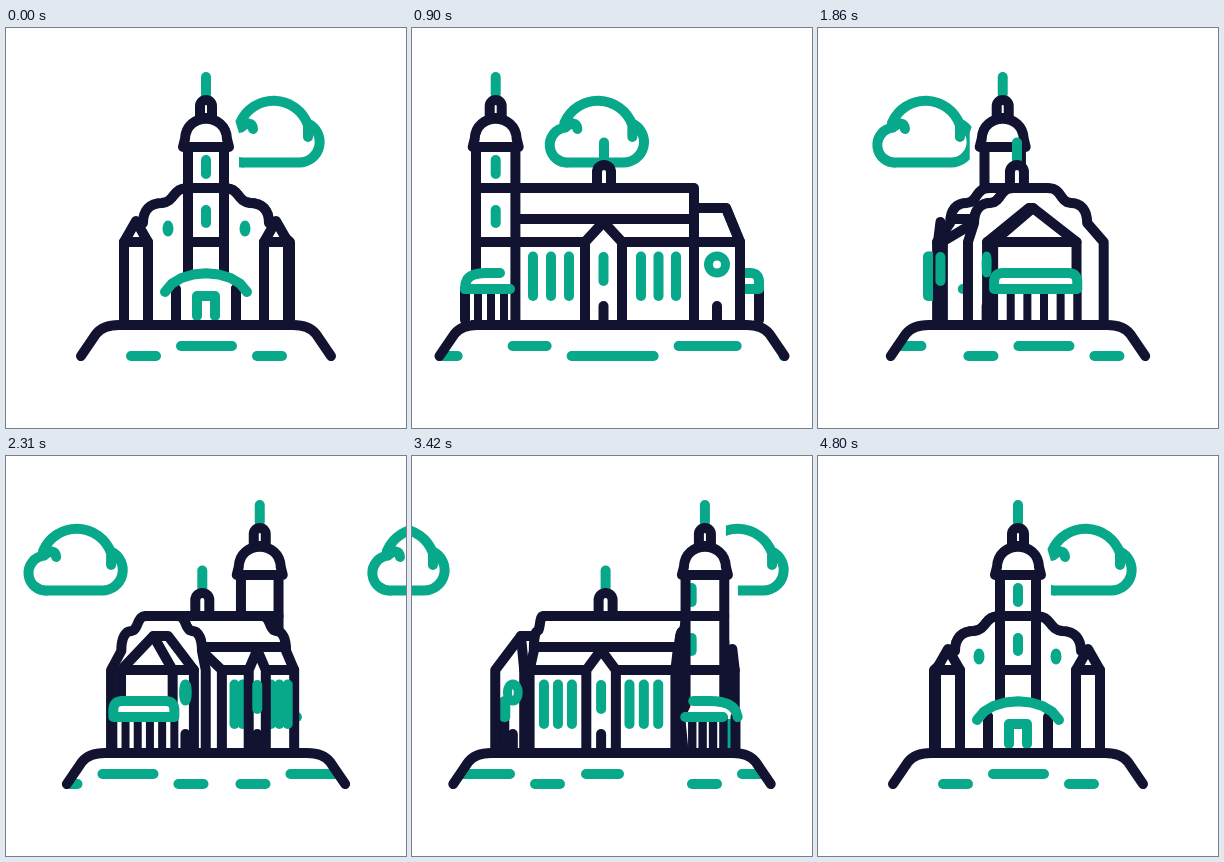
Write an HTML page with a canvas that moves like this. It is 400 px wide and 400 px high and loops after 6830 ms.

```html
<!DOCTYPE html>
<html lang="en">
<head>
<meta charset="utf-8">
<title>Rotating church</title>
<style>
  html, body { margin: 0; width: 100%; height: 100%; overflow: hidden; background: #fff; }
  canvas { display: block; width: 400px; height: 400px; }
</style>
</head>
<body>
<canvas id="stage"></canvas>
<script>
const NAVY = '#121331', TEAL = '#08a88a', WHITE = '#fff';
const LOOP = 6830, TURN = 4800, STEP = 30;
const canvas = document.getElementById('stage');
const ctx = canvas.getContext('2d');
const ratio = window.devicePixelRatio || 1;
canvas.width = canvas.height = 400 * ratio;

// progress of the whole turn: time, share, slope per ms
const KNOTS = [
  [0, 0, .00028], [900, .243, .000252], [1440, .374, .000243], [2310, .586, .000243],
  [2910, .732, .000225], [3900, .912, .00013], [4800, 1, .00004]
];
// dashes on the ground: start, length, height
const DASHES = [
  [125, 25, 328], [175, 51, 318], [251, 25, 328], [331, 34, 318], [390, 82, 328], [497, 58, 318],
  [602, 25, 328], [652, 51, 318], [728, 25, 328], [790, 25, 328], [840, 51, 318], [916, 25, 328],
  [967, 33, 318], [1073, 25, 328], [1123, 51, 318], [1199, 25, 328]
];
const CLOUD = new Path2D(
  'M-28 134.5H26A20.5 20.5 0 0 0 35 95.5M-28 134.5A17.5 17.5 0 0 1 -32 99.5' +
  'Q-21 91 -20 101M-33 95A36.5 36.5 0 0 1 35 97V109');

let p, dir, near, front, side;

const mix = (a, b, k) => a + (b - a) * k;
// lat: distance across the church, len: distance along it
const X = (lat, len) => 200 + near * lat * (1 - p) + dir * len * p;
const towerX = () => 200 + dir * 116.3 * p;

function progress(t) {
  let i = 0;
  while (i < KNOTS.length - 2 && t > KNOTS[i + 1][0]) i++;
  const [t0, a, s0] = KNOTS[i], [t1, b, s1] = KNOTS[i + 1];
  const w = t1 - t0, h = (t - t0) / w, g = 1 - h;
  return a * (1 + 2 * h) * g * g + s0 * w * h * g * g + b * h * h * (3 - 2 * h) - s1 * w * h * h * g;
}

function paint(path, color, fill, width = 10) {
  if (fill) { ctx.fillStyle = fill; path ? ctx.fill(path) : ctx.fill(); }
  if (color) {
    ctx.strokeStyle = color;
    ctx.lineWidth = width;
    path ? ctx.stroke(path) : ctx.stroke();
  }
}

function poly(points, color, fill, closed, width) {
  ctx.beginPath();
  points.forEach(([x, y]) => ctx.lineTo(x, y));
  if (closed) ctx.closePath();
  paint(null, color, fill, width);
}

const line = (x1, y1, x2, y2, color = NAVY, width) => poly([[x1, y1], [x2, y2]], color, null, false, width);
const post = (x, y1, y2, color, width) => line(x, y1, x, y2, color, width);

function bezier(a, b, c, d) {
  const out = [];
  for (let i = 0; i <= 8; i++) {
    const k = i / 8, j = 1 - k;
    out.push([0, 1].map(n => j * j * j * a[n] + 3 * j * j * k * b[n] + 3 * j * k * k * c[n] + k * k * k * d[n]));
  }
  return out;
}

const EDGE = [
  ...bezier([18, 160], [34, 160], [31, 174], [44, 175]),
  ...bezier([44, 175], [56, 175], [63, 182], [63, 195])
];
const gable = (sign, len) => EDGE.map(([lat, y]) => [X(sign * lat, len), y]);

function clouds(u) {
  for (const [x, way] of [[267, 336], [622, 355]]) {
    ctx.save();
    ctx.translate(x - way * u, 0);
    paint(CLOUD, TEAL);
    ctx.restore();
  }
  const c = towerX();
  const half = [[33, 160], [33, 105], [29, 92], [21, 80], [21, 60], [0, 40]];
  poly([...half.map(([x, y]) => [c + x, y]), ...half.map(([x, y]) => [c - x, y]).reverse()], null, WHITE);
}

function tower() {
  const w = mix(18, 19.7, p);
  ctx.save();
  ctx.translate(towerX(), 0);
  post(0, 49, 66, TEAL);
  poly([[-w, 119], [w, 119], [w, 292], [-w, 292]], null, WHITE);
  ctx.save();
  ctx.beginPath();
  ctx.rect(-w, 119, 2 * w, 100);
  ctx.clip();
  const spots = [near * 66 * (1 - p)];
  if (front) spots.push(dir * 31 * p);
  for (const x of spots) {
    post(x, 132, 146, TEAL);
    post(x, 182, 195, TEAL);
  }
  ctx.restore();
  post(-w, 119, 292);
  post(w, 119, 292);
  line(-w, 160, w, 160);
  line(-w, 214, w, 214);
  paint(new Path2D('M-6 90V78A6 6 0 0 1 6 78V90Z'), NAVY, WHITE);
  paint(new Path2D('M-23 119L-21 111C-20 84 20 84 21 111L23 119Z'), NAVY, WHITE);
  ctx.restore();
}

function turret() {
  ctx.save();
  ctx.translate(200 - 8 * p, 0);
  post(0, 114.5, 132, TEAL);
  paint(new Path2D('M-7 158V144A7 7 0 0 1 7 144V158'), NAVY, WHITE);
  ctx.restore();
}

function nave() {
  const backLat = front ? 84 : 100;
  const fx = X(78, 100), bx = X(backLat, -82);
  poly([[fx, 292], [fx, 214], ...gable(1, 100).reverse(), ...gable(1, -82), [bx, 214], [bx, 292]], NAVY, WHITE);
  if (p < .03) return;
  line(X(62, 100), 191, X(62, -82), 191);
  line(fx, 214, bx, 214);
  for (const w of [-64, -46.5, -29]) post(X(front ? 84 : 108, w), 228.5, 268, TEAL);
  for (const w of [43, 61, 79]) post(X(84, w), 228.5, 268, TEAL);
  const l = X(88, -10), r = X(88, 27), mid = X(88, 8.5);
  poly([[l, 292], [l, 214], [mid, 194], [r, 214], [r, 292]], NAVY, WHITE);
  post(mid, 229, 253, TEAL);
  post(mid, 278, 292);
}

function posts(sign, len) {
  const o = X(sign * 82, len), i = X(sign * 58, len);
  poly([[o, 292], [o, 214], [i, 214], [i, 292]], NAVY, WHITE);
  poly([[o, 214], [X(sign * 70, len), 193], [i, 214]], NAVY, WHITE, true);
}

function facade() {
  poly([...gable(1, 100), [X(63, 100), 292], [X(-63, 125), 292], ...gable(-1, 125).reverse()], null, WHITE);
  poly(gable(1, 100), NAVY);
  poly(gable(-1, 125), NAVY);
  if (p < .8) for (const [lat, len] of [[39, 91], [-38, 121]]) {
    ctx.beginPath();
    ctx.ellipse(X(lat, len), 200.5, 5.5 * (1 - p * .3), 8, 0, 0, 7);
    paint(null, null, TEAL);
  }
  posts(-1, 133);
  posts(1, 100);
}

function rear() {
  const far = -82 - 28 * Math.min(1, (1 - p) * 2.5);
  const nx = X(70, -82), fx = X(-82, far);
  poly([[nx, 292], [nx, 214], ...gable(1, -82).reverse(), ...gable(-1, far), [fx, 214], [fx, 292]], NAVY, WHITE);
}

function choir() {
  const w = front ? 72 : 48;
  const corner = X(w, -128), join = X(w, -82), far = X(-w, -128);
  const r1 = X(0, -114), r2 = X(0, -82);
  poly([[far, 292], [far, 214], [r1, 180], [r2, 180], [join, 214], [join, 292]], NAVY, WHITE);
  line(far, 214, join, 214);
  poly([[r1, 180], [corner, 214], [corner, 292]], NAVY);
  if (p < .03) return;
  const x = X(w + 4, -105);
  ctx.beginPath();
  ctx.ellipse(x, 236.5, Math.max(.5, 8.5 * p * p), 8.5, 0, 0, 7);
  paint(null, TEAL, null, 9);
  post(x, 278, 292);
}

function apse() {
  const a = X(-46, -147), b = X(46, -122);
  const l = Math.min(a, b), w = Math.abs(a - b);
  poly([[l, 250], [l + w, 250], [l + w, 292], [l, 292]], null, WHITE);
  const n = p > .85 ? 1 : 5;
  for (let i = 0; i <= n; i++) post(mix(a, b, i / n), 261, 292, NAVY, n > 1 ? 8 : 10);
  const r = Math.min(9, w / 2);
  paint(new Path2D(`M${l} 261V${245 + r}Q${l} 245 ${l + r} 245H${l + w - r}Q${l + w} 245 ${l + w} ${245 + r}V261Z`), TEAL, WHITE);
}

function porch() {
  const k = Math.min(1, p * 2.2);
  const nx = X(41, 112), ny = mix(264, 245, k);
  const fx = X(-41, 147), fy = mix(264, 261, k);
  const arch = bezier([nx, ny], [X(28, 135), mix(239, 245, k)], [X(-28, 147), mix(239, 244, p)], [fx, fy]);
  const start = X(41, 102), end = X(41, 149);
  poly([...arch, [X(-30, 147), 292], [X(30, 103), 292], [start, 261]], null, WHITE);
  if (front && p < .8) {
    const h = 9 * (1 - p), x = X(0, 147);
    poly([[x - h, 288], [x - h, 268], [x + h, 268], [x + h, 288]], TEAL);
  }
  for (const len of [108, 121, 134, 147]) post(X(30, len), 261, 292, NAVY, mix(10, 8, p));
  post(X(-30, 147), 261, 292);
  if (p > .05) line(start, 261, p > .85 ? fx : end, 261, TEAL);
  poly(arch, TEAL);
}

function ground(u) {
  const g = 125 + 48 * mix(side, side * side * (3 - 2 * side), .7);
  const l = 200 - g, r = 200 + g;
  const edge = `M${l} 328L${l + 15} 306Q${l + 22} 297 ${l + 38} 297H${r - 38}Q${r - 22} 297 ${r - 15} 306L${r} 328`;
  ctx.save();
  ctx.clip(new Path2D(edge + 'V340H' + l + 'Z'));
  for (const [x, w, y] of DASHES) {
    const a = x - 948 * u;
    if (a < 400 && a + w > 0) line(a, y, a + w, y, TEAL);
  }
  ctx.restore();
  paint(new Path2D(edge), NAVY);
}

function draw(t) {
  const u = progress(t);
  const q = Math.min(3, Math.floor(u * 4)), f = u * 4 - q;
  side = q % 2 ? 1 - f : f;
  p = Math.min(1, .367 * side + .653 * Math.sin(side * Math.PI / 2));
  dir = q < 2 ? -1 : 1;
  front = q === 0 || q === 3;
  near = front ? -dir : dir;

  ctx.setTransform(ratio, 0, 0, ratio, 0, 0);
  ctx.fillStyle = WHITE;
  ctx.fillRect(0, 0, 400, 400);
  ctx.lineCap = ctx.lineJoin = 'round';
  clouds(u);
  const parts = front
    ? [turret, apse, choir, nave, facade, tower, porch]
    : [tower, porch, turret, nave, rear, ...(p > .85 ? [apse, choir] : [choir, apse])];
  parts.forEach(part => part());
  ground(u);
}

const begin = performance.now();
function tick() {
  const t = (performance.now() - begin) % LOOP;
  draw(Math.min(TURN, Math.floor(t / STEP) * STEP));
  requestAnimationFrame(tick);
}
tick();
</script>
</body>
</html>
```
